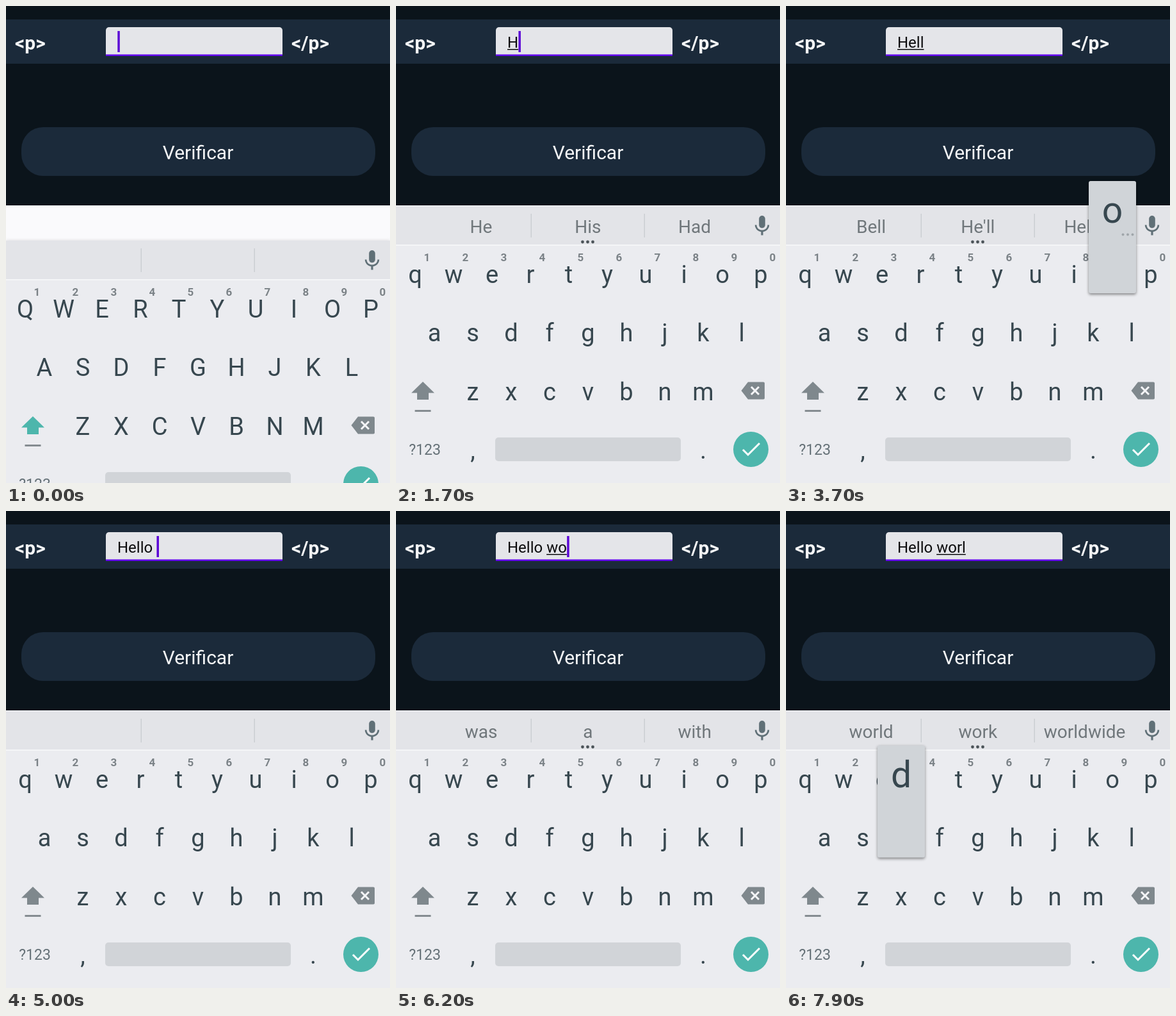
An HTML page with a canvas that plays this animation: 600x744 px, repeating every 8 s.

```html
<!DOCTYPE html>
<html lang="pt">
<head>
<meta charset="utf-8">
<title>Typing exercise</title>
<style>
  html, body { margin: 0; height: 100%; overflow: hidden; background: #0b141b; }
  canvas { display: block; }
</style>
</head>
<body>
<canvas id="stage" width="600" height="744"></canvas>
<script>
const ctx = document.getElementById('stage').getContext('2d');
const LOOP = 8000, STEP = 100, BLINK = 500;
const ROWS = ['qwertyuiop', 'asdfghjkl', 'zxcvbnm'];
const ROW_START = [30, 60, 120];
const TEAL = '#4db6ac', INK = '#37474f', GREY = '#7f888d', PANEL = '#1b2a3a';

// [time, text in the field]; each commit also restarts the caret blink
const TEXTS = [
  [-200, ''], [1300, 'H'], [2000, 'He'], [2700, 'Hel'], [3200, 'Hell'], [3800, 'Hello'],
  [4700, 'Hello '], [5500, 'Hello w'], [6100, 'Hello wo'], [6700, 'Hello wor'], [7400, 'Hello worl']
];
// [time, words in the suggestion strip]
const HINTS = [
  [0, ''], [1400, 'He His Had'], [2100, 'Be The Her'], [2800, 'Help Hello Held'],
  [3300, "Bell He'll Hello"], [4000, "Hell Hello Hello's"], [4700, ''], [5600, 'was a with'],
  [6300, 'so to work'], [6800, 'work world word'], [7500, 'world work worldwide']
];
// [start, end, pressed key]
const PRESSES = [
  [1100, 1400, 'H'], [1800, 2100, 'e'], [2600, 2800, 'l'], [3100, 3300, 'l'], [3700, 3900, 'o'],
  [4500, 4700, ' '], [5300, 5600, 'w'], [6000, 6200, 'o'], [6500, 6800, 'r'], [7200, 7500, 'l'],
  [7800, 8000, 'd']
];
const MIC = new Path2D('M12 14c1.66 0 3-1.34 3-3V5a3 3 0 0 0-6 0v6c0 1.66 1.34 3 3 3z' +
  'm5.3-3c0 3-2.54 5.1-5.3 5.1S6.7 14 6.7 11H5c0 3.41 2.72 6.23 6 6.72V21h2v-3.28c3.28-.48 6-3.3 6-6.72z');
const SHIFT = new Path2D('M42 586L60 603.5H51V614H33V603.5H24Z');
const ERASE = new Path2D('M550 586.5H574Q576 586.5 576 588.5V611.5Q576 613.5 574 613.5H550L539.5 600Z');
const CROSS = new Path2D('M555 594L567 606M567 594L555 606');
const CHECK = new Path2D('M542 692L550 700L568 682');

const latest = (list, t) => list.filter(([time]) => time <= t).pop();

function text(string, x, y, size, color, align = 'center', weight = 400) {
  ctx.font = `${weight} ${size}px Roboto, sans-serif`;
  ctx.textAlign = align;
  ctx.fillStyle = color;
  ctx.fillText(string, x, y);
}

function box(x, y, w, h, color, radius = 0) {
  ctx.fillStyle = color;
  ctx.beginPath();
  ctx.roundRect(x, y, w, h, radius);
  ctx.fill();
}

function disc(x, y, r, color) {
  box(x - r, y - r, 2 * r, 2 * r, color, r);
}

function dots(x, y, gap, r, color) {
  for (const i of [-1, 0, 1]) disc(x + i * gap, y, r, color);
}

function fillPath(path, color) {
  ctx.fillStyle = color;
  ctx.fill(path);
}

function strokePath(path, color) {
  ctx.strokeStyle = color;
  ctx.lineWidth = 3;
  ctx.stroke(path);
}

function drawPage(t) {
  box(0, 0, 600, 311, '#0b141b');
  box(0, 21, 600, 69, PANEL);
  text('<p>', 14, 68, 30, '#f5f6f7', 'left', 700);
  text('</p>', 446, 68, 30, '#f5f6f7', 'left', 700);
  box(156, 33, 276, 45, '#e4e5e9', [5, 5, 0, 0]);
  box(156, 75.5, 276, 2.5, '#6200ee');

  const [since, value] = latest(TEXTS, t);
  text(value, 174, 65, 24, '#0c0c0e', 'left');
  const width = ctx.measureText(value).width;
  const wordStart = ctx.measureText(value.slice(0, value.lastIndexOf(' ') + 1)).width;
  box(174 + wordStart, 67, width - wordStart, 1.5, '#0c0c0e');
  if (Math.floor((t - since) / BLINK) % 2 === 0) box(174.3 + width, 39, 3.5, 33, '#5b06d6');

  box(24, 189, 553, 76, PANEL, 34);
  text('Verificar', 300, 239, 30, '#f5f6f7');
  box(0, 311, 600, 433, '#fafafc');
}

function drawStrip(t) {
  box(0, 312, 600, 60, '#e3e4e8');
  box(0, 372, 600, 2, '#f4f5f7');
  box(210.5, 324, 1.5, 37, '#cbced2');
  box(387.5, 324, 1.5, 37, '#cbced2');
  const words = latest(HINTS, t)[1];
  if (words) {
    words.split(' ').forEach((word, i) => text(word, 133 + 166.8 * i, 354, 28, '#70777b'));
    dots(299.5, 368, 8, 2.4, '#4c5459');
  }
  ctx.save();
  ctx.translate(552.8, 323.8);
  ctx.scale(1.6, 1.6);
  fillPath(MIC, '#607077');
  ctx.restore();
}

function drawKeys(upper, spaceDown) {
  ROWS.forEach((row, r) => [...row].forEach((key, i) => {
    const x = ROW_START[r] + 60 * i;
    text(upper ? key.toUpperCase() : key, x, 431.5 + 91.5 * r, 38, INK);
    if (r === 0) text((i + 1) % 10, x + 18.5, 398, 17, '#7b8287', 'center', 700);
  }));
  fillPath(SHIFT, upper ? TEAL : GREY);
  box(29.5, 630, 25, 3, '#858c91');
  fillPath(ERASE, GREY);
  strokePath(CROSS, '#f4f5f7');
  text('?123', 45, 700, 23, '#667278');
  text(',', 120, 706, 38, INK);
  text('.', 480, 706, 38, INK);
  box(155, 673, 290, 37, spaceDown ? '#bcc1c5' : '#d1d4d8', 5);
  disc(554.5, 691.5, 27.5, TEAL);
  strokePath(CHECK, '#fff');
}

function drawPopup(key) {
  const row = ROWS.findIndex(r => r.includes(key.toLowerCase()));
  const x = ROW_START[row] + 60 * ROWS[row].indexOf(key.toLowerCase());
  const y = 273 + 92.5 * row;
  ctx.save();
  ctx.shadowColor = 'rgba(0,0,0,.45)';
  ctx.shadowBlur = 4;
  ctx.shadowOffsetY = 2;
  box(x - 37, y, 74, 175, '#d0d4d8', 3);
  ctx.restore();
  text(key, x, y + 65, 57, INK);
  if (row === 0) dots(x + 24, y + 83.5, 7.5, 2, '#a0a6aa');
}

function draw(t) {
  const press = PRESSES.find(([start, end]) => t >= start && t < end);
  const key = press && press[2];
  drawPage(t);

  ctx.save();
  ctx.translate(0, 54 * Math.max(0, 1 - t / 250) ** 2);
  ctx.save();
  ctx.shadowColor = 'rgba(0,0,0,.15)';
  ctx.shadowBlur = t < 300 ? 5 : 0;
  box(0, 312, 600, 432, '#ebecf0');
  ctx.restore();
  drawStrip(t);
  drawKeys(t < 1400, key === ' ');
  if (key && key !== ' ') drawPopup(key);
  ctx.restore();
}

function tick() {
  const now = performance.now() % LOOP;
  draw(Math.floor(now / STEP) * STEP);
  requestAnimationFrame(tick);
}
tick();
</script>
</body>
</html>
```
